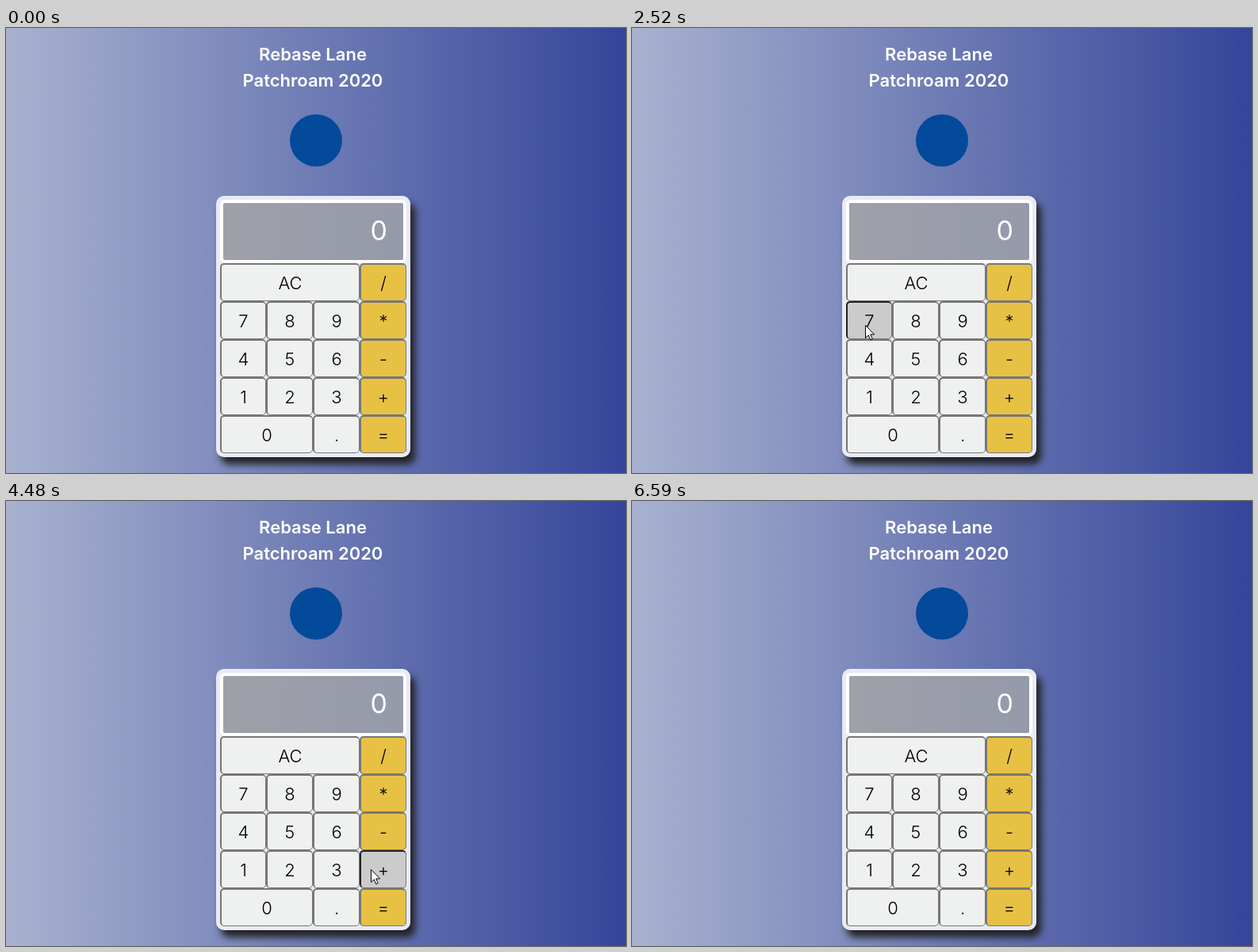
An HTML page that plays this animation: 782 by 562 pixels, repeating every 7780 ms.

```html
<!DOCTYPE html>
<html lang="en">
<head>
<meta charset="utf-8">
<title>Calculator</title>
<style>
  html, body { margin: 0; width: 100%; height: 100%; overflow: hidden; }
  body {
    position: relative;
    background: linear-gradient(to right, #a8b2cf, #34459a);
    font-family: Inter, "Open Sans", sans-serif;
  }
  body *, svg { position: absolute; box-sizing: border-box; }
  h1 {
    left: 0; top: 17px; width: 774px; margin: 0;
    color: #fff; font-size: 22px; font-weight: 600; line-height: 33px; text-align: center;
  }
  h1 br { position: static; }
  .logo { left: 358px; top: 109px; width: 66px; height: 66px; border-radius: 50%; background: #034a9a; }
  .calculator {
    left: 265px; top: 212px; width: 245px; height: 330px;
    border-radius: 10px; background: #e8ebf5; box-shadow: 6px 9px 10px #222;
  }
  .display {
    left: 5px; top: 5px; width: 235px; height: 80px; padding-right: 20px;
    border: 4px solid #fff; border-radius: 6px;
    background: linear-gradient(to right, #9fa0a8, #959aaa);
    color: #fff; font-size: 34px; line-height: 70px; text-align: right;
  }
  .key {
    height: 48px;
    border: solid #767676; border-width: 2px 1px 1px 2px; border-radius: 5px;
    background: #eff0f0; color: #000;
    font-size: 22px; font-weight: 300; line-height: 46px; text-align: center;
  }
  .operator { background: #e7c144; }
  .pressed { background: #cbcbcb; border-color: #222 #767676 #767676 #222; }
  #pointer { left: 0; top: 0; overflow: visible; visibility: hidden; }
</style>
</head>
<body>
<h1>Rebase Lane<br>Patchroam 2020</h1>
<div class="logo"></div>
<div class="calculator"><div class="display">0</div></div>
<svg id="pointer" width="1" height="1">
  <circle id="ring" r="12" fill="#ff0" fill-opacity=".55"/>
  <path d="M.5 .5V16.5L4.2 13 6.8 18.8 9.2 17.7 6.7 12H11.6Z" fill="#fff" stroke="#000"/>
</svg>
<script>
  const LOOP = 7780, SHOWN = 410, HIDDEN = 6590;
  const LEAD = 80, PRESS = 165, RING_DELAY = 74, RING = 165;
  const COLUMN = 58.75, ROW = 48;

  const stop = (time, x, y, key) => ({
    time, x, y, key,
    arrive: time - (key ? LEAD : 0),
    leave: time + (key ? PRESS : 0)
  });

  // Key points of the pointer; those with a key are clicks
  const stops = [
    stop(SHOWN, 536, 531),
    stop(1230, 346, 504, "0"),
    stop(1556, 370, 474, "2"),
    stop(1850, 424, 417, "6"),
    stop(2506, 294, 375, "7"),
    stop(2720, 510, 397),
    stop(3100, 436, 360),
    stop(3610, 458, 318, "/"),
    stop(4070, 458, 318),
    stop(4460, 460, 465, "+"),
    stop(4865, 460, 519, "="),
    stop(5100, 460, 519),
    stop(5415, 367, 512, "0"),
    stop(5810, 405, 516, "."),
    stop(6340, 403, 479, "3"),
    stop(6560, 556, 545)
  ];
  const clicks = stops.filter(s => s.key);

  const calculator = document.querySelector(".calculator");
  const pointer = document.getElementById("pointer");
  const ring = document.getElementById("ring");
  const keys = {};

  // A repeated label widens its key
  ["A A A /", "7 8 9 *", "4 5 6 -", "1 2 3 +", "0 0 . ="].forEach((line, row) => {
    const labels = line.split(" ");
    for (const label of new Set(labels)) {
      const left = Math.floor(labels.indexOf(label) * COLUMN);
      const right = Math.floor((labels.lastIndexOf(label) + 1) * COLUMN);
      const key = document.createElement("div");
      key.className = "key" + (labels[3] === label ? " operator" : "");
      key.textContent = label === "A" ? "AC" : label;
      key.style.left = 5 + left + "px";
      key.style.top = 85 + row * ROW + "px";
      key.style.width = right - left + "px";
      calculator.append(key);
      keys[label] = key;
    }
  });

  const within = (t, start, length) => t >= start && t < start + length;
  const smooth = k => k * k * (3 - 2 * k);

  function tipAt(t) {
    const to = stops.find(s => s.leave > t) || stops[stops.length - 1];
    const from = stops[Math.max(0, stops.indexOf(to) - 1)];
    const span = Math.max(1, to.arrive - from.leave);
    const k = smooth(Math.min(1, Math.max(0, (t - from.leave) / span)));
    return ["x", "y"].map(axis => Math.round(from[axis] + (to[axis] - from[axis]) * k));
  }

  function draw(t) {
    const [x, y] = tipAt(t);
    pointer.style.visibility = within(t, SHOWN, HIDDEN - SHOWN) ? "visible" : "hidden";
    pointer.style.transform = `translate(${x}px, ${y}px)`;
    ring.setAttribute("opacity", clicks.some(c => within(t, c.time + RING_DELAY, RING)) ? 1 : 0);
    const active = clicks.find(c => within(t, c.time, PRESS));
    for (const label in keys) {
      keys[label].classList.toggle("pressed", active?.key === label);
    }
  }

  const begin = performance.now();
  function tick() {
    draw((performance.now() - begin) % LOOP);
    requestAnimationFrame(tick);
  }
  tick();
</script>
</body>
</html>
```
